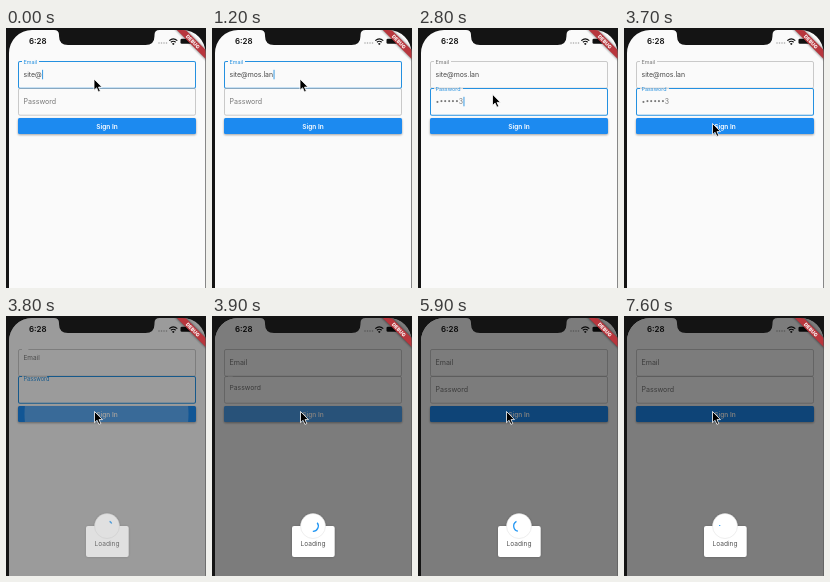
Animation of 200x260 px, one loop 8000 ms. Source, as an HTML page:

```html
<!DOCTYPE html>
<html lang="en">
<head>
<meta charset="utf-8">
<title>Sign in</title>
<style>
  html, body { margin: 0; width: 100%; height: 100%; overflow: hidden; background: #141414; }
  svg { display: block; width: 100vw; height: 100vh; }
  text { font-family: Inter, Roboto, sans-serif; }
  .value { font-size: 6.9px; fill: #484848; }
  .secret { fill: #777; }
  .outline { fill: none; }
  .label { font-size: 7.05px; }
</style>
</head>
<body>
<svg viewBox="0 0 200 260">
  <defs>
    <clipPath id="screen"><path d="M3 260V25A23 23 0 0 1 26 2H176.500A23 23 0 0 1 199.500 25V260Z"/></clipPath>
    <clipPath id="button"><rect x="12" y="90" width="178" height="16" rx="1.500"/></clipPath>
    <filter id="soft" x="-20%" y="-40%" width="140%" height="200%"><feGaussianBlur stdDeviation=".8"/></filter>
  </defs>
  <g clip-path="url(#screen)">
    <rect width="200" height="260" fill="#fafafa"/>
    <text x="23" y="16.300" font-size="7.900" font-weight="600" fill="#111">6:28</text>
    <g fill="#aaa">
      <circle cx="153" cy="15" r=".8"/><circle cx="155.500" cy="15" r=".8"/>
      <circle cx="158" cy="15" r=".8"/><circle cx="160.500" cy="15" r=".8"/>
    </g>
    <g fill="none" stroke="#111" stroke-width="1.200">
      <path d="M163.300 12.600Q167.300 9 171.300 12.600M164.900 14.300Q167.300 12.200 169.700 14.300"/>
      <path d="M166.400 15.600L167.300 16.200L168.200 15.600"/>
    </g>
    <rect x="174.500" y="10.800" width="11" height="5" rx="1.300" fill="#111"/>

    <g id="fields"></g>

    <rect x="12" y="91" width="178" height="16" rx="1.500" opacity=".35" filter="url(#soft)"/>
    <g clip-path="url(#button)">
      <rect x="12" y="90" width="178" height="16" fill="#1c8af0"/>
      <circle id="splash" cx="100.500" cy="98" fill="#fff"/>
    </g>
    <text x="101" y="100.500" font-size="6.500" font-weight="600" fill="#fff" text-anchor="middle">Sign In</text>

    <rect id="dim" width="200" height="260"/>
    <g id="dialog">
      <rect x="80" y="210.300" width="42.700" height="31" rx="2" opacity=".2" filter="url(#soft)"/>
      <circle cx="101" cy="210.300" r="12.500" opacity=".3" filter="url(#soft)"/>
      <rect x="80" y="210" width="42.700" height="31" rx="2" fill="#fff"/>
      <circle cx="101" cy="210" r="12.500" fill="#fff" stroke="#ddd" stroke-width=".5"/>
      <path id="arc" fill="none" stroke="#2196f3" stroke-width="1.300"/>
      <text x="101" y="229.700" font-size="6.600" fill="#555" text-anchor="middle">Loading</text>
    </g>

    <g transform="translate(199.500 1) rotate(45)">
      <rect x="-24" y="14.700" width="48" height="6.500" opacity=".6" filter="url(#soft)"/>
      <rect x="-24" y="14.700" width="48" height="6.300" fill="#b8363d"/>
      <text y="19.700" font-size="5" font-weight="800" fill="#fff" text-anchor="middle">DEBUG</text>
    </g>
    <path d="M48 2Q53 2 53 7V8Q53 17 62 17H139.500Q148.500 17 148.500 8V7Q148.500 2 153.500 2Z" fill="#141414"/>
  </g>
  <path id="pointer" d="M0 0V11.200L2.600 8.800L4.400 12.900L6.300 12L4.500 8.100H8Z" fill="#000" stroke="#fff" stroke-width=".8"/>
</svg>
<script>
const $ = id => document.getElementById(id);
const NS = 'http://www.w3.org/2000/svg';
const LOOP = 8000, BLUE = '#2490e0';

const email = 'site@mos.lan', password = '1231233';
const emailTimes = [300, 400, 600, 800, 900, 1100, 1200];
const passwordTimes = [2200, 2300, 2400, 2500, 2600, 2700, 2800];
// The spinner only repaints at these moments once the dialog is up.
const repaints = [4400, 4600, 4800, 5000, 5300, 5700, 5900, 6400, 6900, 7600];

const clamp = x => Math.max(0, Math.min(1, x));
const ramp = (t, from, to) => clamp((t - from) / (to - from));
const smooth = x => x * x * (3 - 2 * x);
const mix = (a, b, k) => a + (b - a) * k;
const typed = (times, t) => times.filter(at => at <= t).length;

function set(el, attrs) {
  for (const name in attrs) el.setAttribute(name, attrs[name]);
}

function add(parent, tag, attrs) {
  const el = document.createElementNS(NS, tag);
  set(el, attrs);
  return parent.appendChild(el);
}

function makeField(name, top, gap, style = '') {
  const g = $('fields');
  const outline = add(g, 'path', { class: 'outline' });
  const label = add(g, 'text', { class: 'label' });
  const value = add(g, 'text', { class: 'value ' + style, x: 17.5, y: top + 15.3 });
  const caret = add(g, 'rect', { y: top + 8.3, width: 0.9, height: 9.5, fill: BLUE });
  const bottom = top + 26.7;
  label.textContent = name;

  return (text, focused, float, showCaret) => {
    set(outline, {
      d: `M${16 + gap * float} ${top}H188Q189.5 ${top} 189.5 ${top + 1.5}V${bottom - 1.5}` +
         `Q189.5 ${bottom} 188 ${bottom}H14Q12.5 ${bottom} 12.5 ${bottom - 1.5}V${top + 1.5}Q12.5 ${top} 14 ${top}H16`,
      stroke: focused ? BLUE : '#a8a8a8',
      'stroke-width': focused ? 1.05 : 0.6
    });
    set(label, {
      transform: `translate(17.5 ${mix(top + 15.4, top + 2.8, float)}) scale(${mix(1, 0.77, float)})`,
      fill: focused ? BLUE : '#777'
    });
    value.textContent = text;
    const width = text ? value.getComputedTextLength() : 0;
    set(caret, { x: 18 + width, opacity: showCaret ? 1 : 0 });
  };
}

const drawEmail = makeField('Email', 33.5, 17);
const drawPassword = makeField('Password', 60.5, 29, 'secret');

// Cubic Bezier (.4, 0, .2, 1), solved by bisection.
function fastOutSlowIn(x) {
  let lo = 0, hi = 1;
  for (let i = 0; i < 20; i++) {
    const s = (lo + hi) / 2, r = 1 - s;
    if (1.2 * r * r * s + 0.6 * r * s * s + s * s * s < x) lo = s; else hi = s;
  }
  return lo * lo * (3 - 2 * lo);
}

function arcPath(t) {
  const cycles = Math.max(0, t - 3672) / 1333;
  const step = Math.floor(cycles), u = cycles - step;
  const head = fastOutSlowIn(clamp(u * 2)), tail = fastOutSlowIn(clamp(u * 2 - 1));
  const start = Math.PI * (1.5 * tail + 1.7 * u - 0.8 * step - 0.5);
  const sweep = Math.max(1.5 * Math.PI * (head - tail), 0.15);
  const at = a => `${101 + 5.3 * Math.cos(a)} ${210 + 5.3 * Math.sin(a)}`;
  return `M${at(start)}A5.3 5.3 0 ${sweep > Math.PI ? 1 : 0} 1 ${at(start + sweep)}`;
}

function draw(time) {
  const t = Math.floor(time / 100) * 100;
  const sent = t >= 3800;

  const count = typed(passwordTimes, t);
  const secret = count ? '•'.repeat(count - 1) + password[count - 1] : '';
  drawEmail(sent ? '' : email.slice(0, 5 + typed(emailTimes, t)), t < 2100,
    1 - ramp(t, 3700, 3860), t < 2100);
  const rise = smooth(ramp(t, 2050, 2270)), fall = smooth(ramp(t, 3755, 3950));
  drawPassword(sent ? '' : secret, t >= 2100 && t < 3900, rise - fall, t >= 2100 && t < 3300);

  const first = smooth(ramp(t, 1500, 2100)), second = smooth(ramp(t, 3100, 3600));
  const x = mix(mix(88, 74.5, first), 88.5, second);
  const y = mix(mix(51, 66.3, first), 95.5, second);
  set($('pointer'), { transform: `translate(${x} ${y})` });

  set($('splash'), { r: t < 3900 ? 82 : 120, opacity: sent ? 0.28 * (1 - ramp(t, 3800, 4400)) : 0 });
  set($('dim'), { opacity: 0.5 * ramp(t, 3700, 3832) });
  set($('dialog'), { opacity: ramp(t, 3700, 3845) });
  const shown = t < 4400 ? t : repaints.filter(at => at <= t).pop();
  set($('arc'), { d: arcPath(shown) });
}

const begin = performance.now();
function frame() {
  draw((performance.now() - begin) % LOOP);
  requestAnimationFrame(frame);
}
frame();
</script>
</body>
</html>
```
